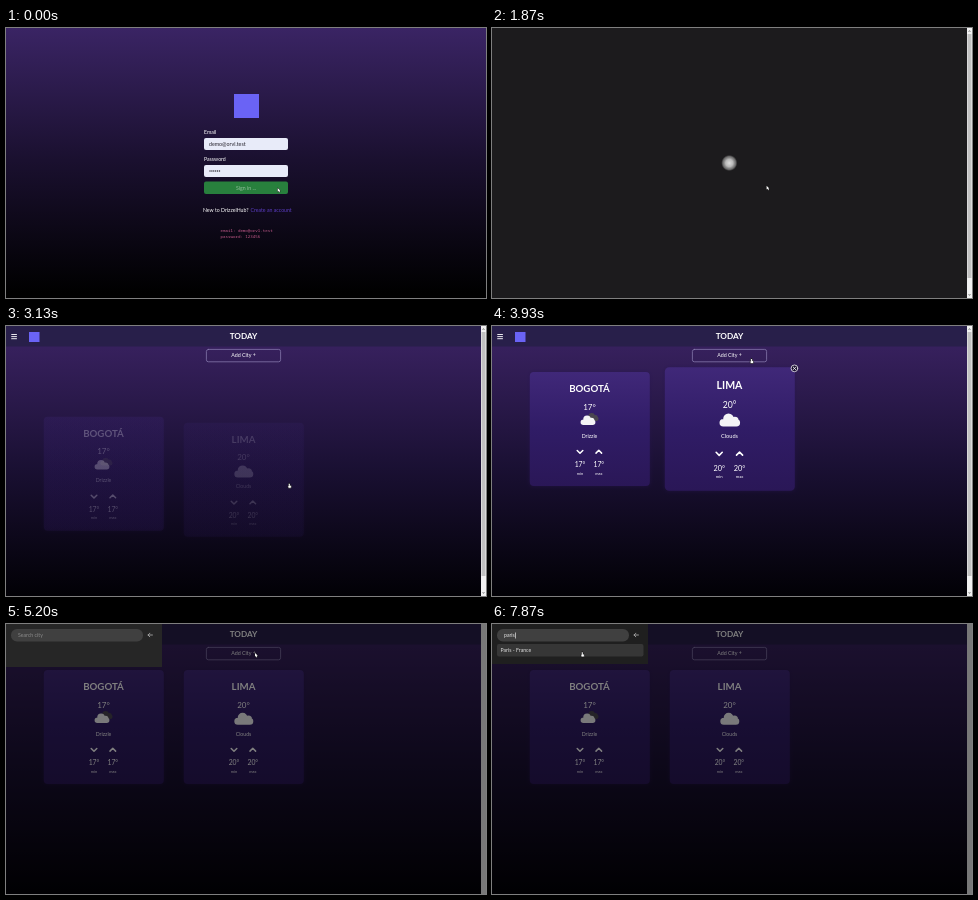
Recreate the animation shown at these times as an HTML page with a canvas. Size 480 px wide and 270 px high, loop 8000 ms.

```html
<!DOCTYPE html>
<html lang="en">
<head>
<meta charset="utf-8">
<title>Weather dashboard</title>
<style>
  html, body { margin: 0; width: 100%; height: 100%; overflow: hidden; background: #000; }
  canvas { display: block; width: 480px; height: 270px; }
</style>
</head>
<body>
<canvas id="stage" width="480" height="270"></canvas>
<script>
const ctx = document.getElementById('stage').getContext('2d');
const LOOP = 8000;
const SANS = 'Lato, "Open Sans", sans-serif';
const MONO = '"Noto Sans Mono", "DejaVu Sans Mono", monospace';
const ACCENT = '#6a63f5';

const clamp = v => Math.min(1, Math.max(0, v));
const ramp = (t, from, to) => clamp((t - from) / (to - from));
const smooth = p => p * p * (3 - 2 * p);
const easeOut = p => 1 - (1 - p) ** 3;
const mix = (a, b, p) => a + (b - a) * p;
const mixGrey = (a, b, p) => {
  const v = Math.round(mix(a, b, p));
  return `rgb(${v}, ${v}, ${v})`;
};

function rect(x, y, w, h, fill, radius = 0, stroke) {
  ctx.beginPath();
  ctx.roundRect(x, y, w, h, radius);
  if (fill) { ctx.fillStyle = fill; ctx.fill(); }
  if (stroke) { ctx.strokeStyle = stroke; ctx.lineWidth = 0.8; ctx.stroke(); }
}

function text(str, x, y, size, { color = '#fff', weight = 400, align = 'left', font = SANS } = {}) {
  ctx.font = `${weight} ${size}px ${font}`;
  ctx.textAlign = align;
  ctx.textBaseline = 'alphabetic';
  ctx.fillStyle = color;
  ctx.fillText(str, x, y);
}

function line(points, color, width) {
  ctx.beginPath();
  points.forEach(([x, y]) => ctx.lineTo(x, y));
  ctx.strokeStyle = color;
  ctx.lineWidth = width;
  ctx.lineCap = ctx.lineJoin = 'round';
  ctx.stroke();
}

function gradient(y0, y1, ...colors) {
  const g = ctx.createLinearGradient(0, y0, 0, y1);
  colors.forEach((c, i) => g.addColorStop(i / (colors.length - 1), c));
  return g;
}

// Runs a drawing function with its own opacity and transform.
function layer(alpha, draw) {
  ctx.save();
  ctx.globalAlpha *= alpha;
  draw();
  ctx.restore();
}

function drawLogin(t) {
  rect(0, 0, 480, 270, gradient(0, 265, '#3a2464', '#1a102f', '#000'));
  rect(228, 66, 25, 24, ACCENT);

  text('Email', 198, 105.5, 5.2);
  rect(198, 110, 84, 12, '#e8ebf9', 2);
  text('demo@orvl.test', 203, 118, 5.3, { color: '#25222c' });

  text('Password', 198, 132.5, 5.2);
  rect(198, 137, 84, 12, '#e8ebf9', 2);
  for (let i = 0; i < 6; i++) {
    ctx.beginPath();
    ctx.arc(204 + i * 1.9, 143, 0.7, 0, 7);
    ctx.fillStyle = '#25222c';
    ctx.fill();
  }

  rect(198, 153.5, 84, 12.5, '#28803d', 2);
  layer(mix(0.5, 0.9, ramp(t, 70, 300)), () =>
    text('Sign in ...', 240, 161.7, 5.2, { align: 'center' }));

  text('New to DrizzelHub?', 242.5, 184, 5.2, { align: 'right' });
  text('Create an account', 244.5, 184, 5.2, { color: '#5a3cc0' });
  const hint = { color: '#c75c8c', font: MONO };
  text('email: demo@orvl.test', 214.5, 203.5, 4.15, hint);
  text('password: 123456', 214.5, 210, 4.15, hint);
}

function drawScrollbar(locked) {
  rect(475, 0, 5, 270, '#f1f1f1');
  if (locked) return;
  rect(475.5, 6, 4, 244, '#c1c1c1');
  line([[476.8, 3.5], [477.5, 2.6], [478.2, 3.5]], '#555', 0.7);
  line([[476.8, 266.5], [477.5, 267.4], [478.2, 266.5]], '#555', 0.7);
}

function drawHome() {
  rect(0, 0, 475, 270, gradient(15, 268, '#38215f', '#1a1033', '#020106'));
  rect(0, 0, 475, 20.5, '#281f4a');
  for (const y of [8.5, 10.6, 12.7]) line([[5.5, y], [10.5, y]], '#fff', 0.9);
  rect(23, 6, 10.5, 10, ACCENT);
  text('TODAY', 237.5, 13.4, 8.2, { weight: 700, align: 'center' });
  rect(200.4, 23.4, 74.2, 12.4, null, 2, '#8578ab');
  text('Add City +', 237.5, 31.3, 5.3, { align: 'center' });
}

function cloud(x, y, scale, color) {
  ctx.save();
  ctx.translate(x, y);
  ctx.scale(scale, scale);
  ctx.beginPath();
  ctx.roundRect(-9.5, -1, 19, 7, 3.5);
  for (const [cx, cy, r] of [[-1.2, -1.2, 4.9], [4.6, 0.4, 3.6]]) {
    ctx.moveTo(cx + r, cy);
    ctx.arc(cx, cy, r, 0, 2 * Math.PI);
  }
  ctx.fillStyle = color;
  ctx.fill();
  ctx.restore();
}

const cities = [
  { name: 'BOGOTÁ', x: 97.8, temp: '17°', sky: 'Drizzle', start: 0.25 },
  { name: 'LIMA', x: 237.8, temp: '20°', sky: 'Clouds', start: 0.15 },
];

function drawCard(city, shown, hover) {
  const centered = { align: 'center' };
  layer(shown, () => {
    ctx.translate(city.x, 103 + 60 * (1 - shown));
    ctx.scale(1 + 0.083 * hover, 1 + 0.083 * hover);

    ctx.shadowColor = 'rgba(38, 20, 80, .6)';
    ctx.shadowBlur = 4;
    rect(-60, -57, 120, 114, gradient(-57, 57, '#402879', '#301c66', '#2a1757'), 4);
    ctx.shadowColor = 'transparent';

    text(city.name, -0.3, -37, 9.7, { weight: 700, align: 'center' });
    text(city.temp, -0.3, -19.2, 8, centered);
    if (city.sky === 'Drizzle') {
      cloud(2.6, -12, 0.65, '#4a4650');
      cloud(-1.8, -8.8, 0.78, '#f4f4f6');
    } else {
      cloud(0, -8.2, 1, '#f4f4f6');
    }
    text(city.sky, -0.3, 8.7, 5.2, centered);

    [[-9.8, 1, 'min'], [9, -1, 'max']].forEach(([x, dir, label]) => {
      line([[x - 2.8, 22.8 - 1.3 * dir], [x, 22.8 + 1.5 * dir], [x + 2.8, 22.8 - 1.3 * dir]], '#fff', 1.5);
      text(city.temp, x, 38.4, 6.8, centered);
      text(label, x, 45.5, 3.9, centered);
    });

    if (hover > 0) layer(hover, () => {
      ctx.beginPath();
      ctx.arc(59.7, -56, 3.1, 0, 7);
      ctx.fillStyle = '#150b2b';
      ctx.fill();
      ctx.strokeStyle = '#fff';
      ctx.lineWidth = 0.7;
      ctx.stroke();
      line([[58.5, -57.2], [60.9, -54.8]], '#fff', 0.8);
      line([[60.9, -57.2], [58.5, -54.8]], '#fff', 0.8);
    });
  });
}

function drawLoading(t) {
  const veil = ramp(t, 930, 1530) * (1 - ramp(t, 1930, 2550));
  if (!veil) return;
  layer(veil, () => rect(0, 0, 475, 270, '#1c1b1d'));

  const radius = 8.3 * ramp(t, 1210, 1880) + 3 * ramp(t, 1880, 2200);
  if (!radius) return;
  const glow = ctx.createRadialGradient(237.3, 135, 0, 237.3, 135, radius);
  glow.addColorStop(0, '#dcdcdc');
  glow.addColorStop(0.45, '#b8b8b8');
  glow.addColorStop(0.8, 'rgba(130, 130, 130, .75)');
  glow.addColorStop(1, 'rgba(90, 90, 90, 0)');
  layer(1 - ramp(t, 1900, 2250), () => {
    ctx.beginPath();
    ctx.arc(237.3, 135, radius, 0, 7);
    ctx.fillStyle = glow;
    ctx.fill();
  });
}

function drawSearch(t) {
  const open = easeOut(ramp(t, 4120, 4600));
  if (!open) return;
  layer(0.5 * open, () => rect(0, 0, 480, 270, '#000'));

  ctx.save();
  ctx.translate(-157 * (1 - open), 0);
  const found = ramp(t, 6300, 6450);
  rect(0, 0, 156, mix(43, 40, found), mixGrey(38, 31, found));
  rect(5, 5, 132, 12.5, '#404040', 6);

  const typed = 'paris'.slice(0, Math.max(0, Math.ceil((t - 5220) / 75)));
  text(typed || 'Search city', 12, 13.2, 5.2, { color: typed ? '#e4e4e4' : '#8b8b8b' });
  const caretOn = typed && (t < 5600 || Math.floor((t - 5600) / 530) % 2 === 0);
  if (caretOn) rect(12.4 + ctx.measureText(typed).width, 8.5, 0.7, 6, '#e4e4e4');

  line([[146.5, 11], [142, 11]], '#a5a5a5', 0.9);
  line([[143.8, 9.2], [142, 11], [143.8, 12.8]], '#a5a5a5', 0.9);

  if (found) layer(found, () => {
    rect(5, 20, 146.5, 12.5, mixGrey(43, 54, ramp(t, 7000, 7200)), 2);
    text('Paris - France', 8.5, 28.2, 5.2, { color: '#dedede' });
  });
  ctx.restore();
}

// Pointer stops: time, x, y.
const stops = [
  [0, 271.7, 160], [150, 271.7, 160], [800, 274.6, 157.8], [2669, 274.6, 157.8],
  [2670, 283.3, 157.3], [3450, 283.3, 157.3], [3920, 259.5, 32.6], [4050, 259.5, 32.6],
  [4700, 249, 29], [6280, 249, 29], [7150, 96, 31], [7700, 90.3, 28], [LOOP, 90.3, 28],
];

function drawPointer(t) {
  const i = Math.max(1, stops.findIndex(s => s[0] > t));
  const [a, b] = [stops[i - 1], stops[i]];
  const p = smooth(ramp(t, a[0], b[0]));
  const hand = (t >= 2670 && t < 4250) || t > 7000;

  ctx.save();
  ctx.translate(mix(a[1], b[1], p), mix(a[2], b[2], p));
  ctx.scale(0.82, 0.82);
  if (hand) {
    rect(-0.9, 0, 1.7, 4.5, '#fff', 0.8, '#111');
    rect(-1.6, 2.4, 4.1, 3.6, '#fff', 1.2, '#111');
    rect(-0.6, 0.4, 1.1, 3.5, '#fff', 0.5);
  } else {
    ctx.beginPath();
    [[0, 0], [0, 4.6], [1.1, 3.7], [1.9, 5.4], [2.8, 5], [2, 3.4], [3.4, 3.3]]
      .forEach(([x, y]) => ctx.lineTo(x, y));
    ctx.closePath();
    ctx.strokeStyle = '#111';
    ctx.lineWidth = 0.9;
    ctx.stroke();
    ctx.fillStyle = '#fff';
    ctx.fill();
  }
  ctx.restore();
}

function draw(t) {
  ctx.clearRect(0, 0, 480, 270);
  if (t < 930) {
    drawLogin(t);
  } else {
    drawHome();
    if (t >= 3130) {
      const hover = smooth(ramp(t, 3560, 3760)) * (1 - smooth(ramp(t, 3960, 4160)));
      cities.forEach((city, i) => {
        const shown = mix(city.start, 1, easeOut(ramp(t, 3130, 3550 + i * 50)));
        drawCard(city, shown, i ? hover : 0);
      });
    }
    drawLoading(t);
    drawScrollbar(t >= 4120);
    drawSearch(t);
  }
  drawPointer(t);
}

function tick() {
  draw(performance.now() % LOOP);
  requestAnimationFrame(tick);
}
tick();
</script>
</body>
</html>
```
